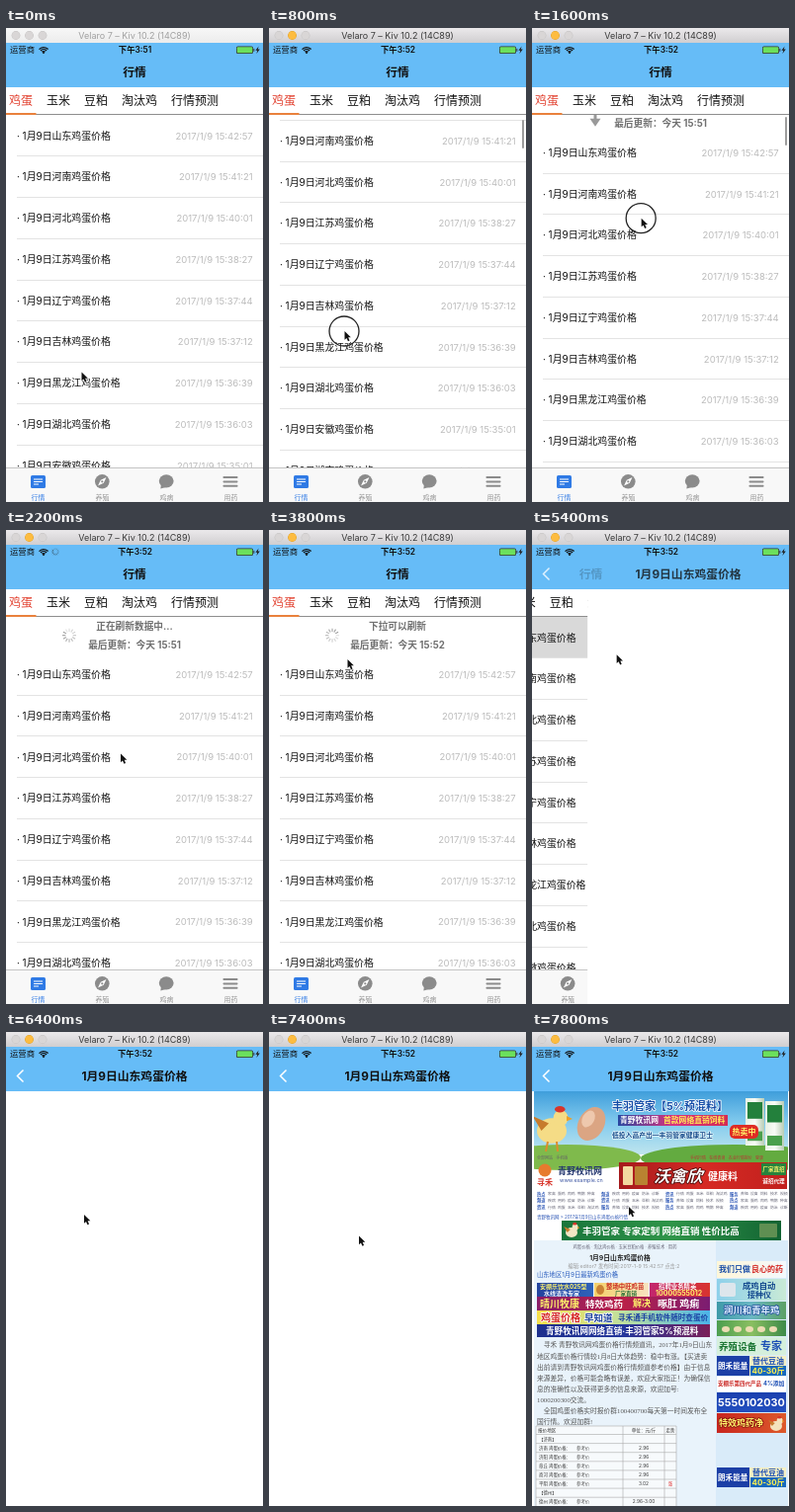
An HTML page with a canvas for the animation above (8000 ms loop, 260 by 480 pixels).

```html
<!DOCTYPE html>
<html lang="zh-CN">
<head>
<meta charset="utf-8">
<style>
html, body { margin: 0; width: 100%; height: 100%; overflow: hidden; background: #fff; }
canvas { display: block; width: 260px; height: 480px; }
</style>
</head>
<body>
<canvas id="stage"></canvas>
<script>
const W = 260, H = 480, LOOP = 8000, STEP = 200;
const SANS = 'Inter, "Noto Sans CJK SC", "Noto Sans CJK", sans-serif';
const SERIF = '"Liberation Serif", "Noto Sans CJK SC", "Noto Sans CJK", serif';
const BLUE = '#66bcf7', GREY = '#929292', ROW = 41.75, TOP = 88, HEAD = 37.4;
const ACTIVE = 200, RELEASE = 2000, REFRESHED = 3800, TAP = 5000, OPEN = 5200, LOADED = 7600;
const canvas = document.getElementById('stage');
const g = canvas.getContext('2d');
const dpr = window.devicePixelRatio || 1;
canvas.width = W * dpr;
canvas.height = H * dpr;

const rows = [
  ['山东', '42:57'], ['河南', '41:21'], ['河北', '40:01'], ['江苏', '38:27'],
  ['辽宁', '37:44'], ['吉林', '37:12'], ['黑龙江', '36:39'], ['湖北', '36:03'],
  ['安徽', '35:01'], ['湖南', '34:22'], ['江西', '33:40'], ['四川', '33:05']
];

// Finger drags: list and cursor move together, with resistance past the top
const shiftKeys = [[0, 0], [ACTIVE, 0], [800, -36.5], [1000, -48], [1200, -48], [1800, 50],
  [RELEASE, 42], [2200, HEAD], [REFRESHED, HEAD], [4200, 0], [LOOP, 0]];
const cursorKeys = [[0, 76.5, 348.5], [ACTIVE, 76.5, 348.5], [800, 76.5, 307], [1000, 78, 295],
  [1200, 100, 125], [1800, 116, 226.5], [2400, 116, 226.5], [REFRESHED, 79.5, 131],
  [4800, 87, 114.5], [OPEN, 87, 114.5], [6400, 79, 185], [7000, 84, 236],
  [7800, 98, 177], [LOOP, 98, 177]];

// Linear interpolation through [time, ...values]
function at(keys, t) {
  let i = 1;
  while (i < keys.length - 1 && keys[i][0] < t) i++;
  const a = keys[i - 1], b = keys[i];
  const k = Math.min(1, Math.max(0, (t - a[0]) / (b[0] - a[0])));
  return a.slice(1).map((v, n) => v + (b[n + 1] - v) * k);
}

function rect(x, y, w, h, color) {
  g.fillStyle = color;
  g.fillRect(x, y, w, h);
}

function box(x, y, w, h, r, color) {
  g.fillStyle = color;
  g.beginPath();
  g.roundRect(x, y, w, h, r);
  g.fill();
}

function oval(x, y, rx, ry, color, turn = 0) {
  g.fillStyle = color;
  g.beginPath();
  g.ellipse(x, y, rx, ry, turn, 0, 7);
  g.fill();
}

function poly(points, color) {
  g.fillStyle = color;
  g.beginPath();
  points.forEach(([x, y]) => g.lineTo(x, y));
  g.closePath();
  g.fill();
}

function line(points, color, width = 1) {
  g.strokeStyle = color;
  g.lineWidth = width;
  g.beginPath();
  points.forEach(([x, y]) => g.lineTo(x, y));
  g.stroke();
}

// y is the visual middle of the line
function text(str, x, y, size, color, o = {}) {
  g.font = `${o.style || ''} ${o.weight || 400} ${size}px ${o.font || SANS}`;
  g.textAlign = o.align || 'left';
  g.textBaseline = 'alphabetic';
  if (o.edge) {
    g.strokeStyle = o.edge;
    g.lineWidth = 1.6;
    g.lineJoin = 'round';
    g.strokeText(str, x, y + size * 0.37);
  }
  g.fillStyle = color;
  g.fillText(str, x, y + size * 0.37);
}

function bold(str, x, y, size, color, edge) {
  text(str, x, y, size, color, { weight: 700, edge });
}

function mid(str, x, y, size, color, weight = 400) {
  text(str, x, y, size, color, { align: 'center', weight });
}

function fade(x, y, w, h, colors, down) {
  const grad = g.createLinearGradient(x, y, down ? x : x + w, down ? y + h : y);
  colors.forEach((c, i) => grad.addColorStop(i / (colors.length - 1), c));
  rect(x, y, w, h, grad);
}

function clipped(x, y, w, h, draw) {
  g.save();
  g.beginPath();
  g.rect(x, y, w, h);
  g.clip();
  draw();
  g.restore();
}

function spinner(x, y, r, t, shade) {
  const lead = Math.floor(t / 100) % 12;
  for (let i = 0; i < 12; i++) {
    const a = i * Math.PI / 6, age = (lead - i + 12) % 12;
    g.globalAlpha = 0.85 - age * 0.055;
    line([[x + Math.sin(a) * r * 0.52, y - Math.cos(a) * r * 0.52],
      [x + Math.sin(a) * r, y - Math.cos(a) * r]], shade, r * 0.16);
  }
  g.globalAlpha = 1;
}

function windowBar(active) {
  fade(0, 0, W, 15, active ? ['#ebe9eb', '#d0ced0'] : ['#f7f7f7', '#ececec'], true);
  [10, 23.5, 37].forEach((x, i) => {
    const on = active && i === 1;
    oval(x, 7.5, 4.4, 4.4, on ? '#dfa023' : '#c3c1c1');
    oval(x, 7.5, 3.9, 3.9, on ? '#fdbc40' : '#d9d6d6');
  });
  mid('Velaro 7 – Kiv 10.2 (14C89)', 130, 7.7, 9, active ? '#3a3a3a' : '#a0a0a0');
}

function statusBar(t) {
  text('运营商', 4, 22.3, 8.4, '#111');
  for (let r = 2; r < 7; r += 2) {
    g.strokeStyle = '#111';
    g.lineWidth = 1.3;
    g.beginPath();
    g.arc(38, 25.6, r, -Math.PI * 0.77, -Math.PI * 0.23);
    g.stroke();
  }
  oval(38, 25, 1, 1, '#111');
  if (t >= RELEASE && t < REFRESHED) spinner(50, 22, 3.8, t, '#222');
  mid(t < ACTIVE ? '下午3:51' : '下午3:52', 130.5, 22.3, 8.4, '#111', 600);
  box(233, 18.5, 17, 7.5, 1.6, '#333');
  box(233.7, 19.2, 15.6, 6.1, 1, '#6be05c');
  rect(250.3, 20.8, 1, 3, '#333');
  poly([[255.6, 18.5], [252.4, 22.8], [254.3, 22.8], [253.4, 26], [256.8, 21.6], [254.8, 21.6]], '#222');
}

function categories() {
  rect(0, 60, W, 28, '#fff');
  rect(0, 87, W, 1, '#8e8e8e');
  rect(0, 86, 30.5, 2, '#e9813c');
  ['鸡蛋', '玉米', '豆粕', '淘汰鸡', '行情预测'].forEach((name, i) =>
    text(name, [3, 41, 79, 117, 167][i], 73.3, 12, i ? '#111' : '#e2402f'));
}

function refreshHead(shift, t) {
  const y = TOP + shift - HEAD;
  const busy = t >= RELEASE && t < REFRESHED, done = t >= REFRESHED;
  const label = busy ? '正在刷新数据中...' : !done && shift > HEAD ? '松开立即刷新' : '下拉可以刷新';
  mid(label, 130, y + 9.4, 9.7, '#707070', 700);
  mid('最后更新：今天 ' + (done ? '15:52' : '15:51'), 130, y + 28, 9.7, '#707070', 700);
  if (busy || done) {
    spinner(64, y + 18.7, 7, t, '#8a8a8a');
    return;
  }
  const up = shift > HEAD ? -1 : 1, m = y + 18.7;
  line([[64, m - 12 * up], [64, m + 8 * up]], '#999', 3);
  poly([[58.5, m + 5 * up], [69.5, m + 5 * up], [64, m + 13 * up]], '#999');
}

function list(shift, t) {
  rect(0, TOP, W, 358, '#fff');
  clipped(0, TOP, W, 358, () => {
    if (shift > 0) refreshHead(shift, t);
    rows.forEach(([place, time], i) => {
      const y = TOP + shift + i * ROW;
      if (i === 0 && t >= TAP && t < 6000) rect(0, y, W, ROW, '#d9d9d9');
      text(`· 1月9日${place}鸡蛋价格`, 11, y + 21, 9.9, '#111');
      text(`2017/1/9 15:${time}`, 249.7, y + 21, 9.5, '#bcbcbc', { align: 'right' });
      rect(11, Math.floor(y + ROW), W - 11, 1, '#e3e3e3');
    });
    if (t > ACTIVE && t < 2200) box(256, 90 - Math.min(shift, 0) * 0.08, 2, 29, 1, '#9c9c9c');
  });
}

function tabBar() {
  rect(0, 446, W, 34, '#f8f8f8');
  rect(0, 445, W, 1, '#c4c4c4');
  box(25, 453, 15, 13, 1.6, '#2f7ae5');
  [[28, 456.5, 9], [28, 459, 9], [28, 461.5, 5]].forEach(([x, y, w]) => rect(x, y, w, 1, '#fff'));
  oval(97.3, 459.3, 7.3, 7.3, '#8b8b8b');
  poly([[101.5, 455], [98.8, 460.8], [93, 463.6], [95.8, 457.8]], '#fff');
  oval(97.3, 459.3, 1.1, 1.1, '#8b8b8b');
  oval(162.2, 458.8, 7.4, 6.6, '#8b8b8b');
  poly([[157, 462], [156.3, 466.5], [162, 465]], '#8b8b8b');
  for (let y = 454; y < 465; y += 4.4) box(219.5, y, 15, 2, 0.8, '#8b8b8b');
  ['行情', '养殖', '鸡病', '用药'].forEach((name, i) =>
    mid(name, 32.5 + i * 65, 475, 6.9, i ? GREY : '#2f7ae5'));
}

function hen(x, y, s, body) {
  oval(x, y, s, s * 0.85, body);
  oval(x + s * 0.6, y - s * 0.85, s * 0.5, s * 0.55, body);
  oval(x + s * 0.55, y - s * 1.45, s * 0.35, s * 0.22, '#d8352a');
  poly([[x + s, y - s], [x + s * 1.4, y - s * 0.8], [x + s, y - s * 0.65]], '#eda029');
  poly([[x - s * 0.7, y], [x - s * 1.3, y - s], [x - s * 0.2, y - s * 0.5]], '#c77b2c');
}

function bag(x, y, w, h) {
  fade(x, y, w, h, ['#e8f0e4', '#f8fbf6', '#b9cdb5']);
  rect(x + 2, y + 4, w - 4, h * 0.35, '#23803c');
  rect(x + 2, y + h * 0.7, w - 4, h * 0.2, '#4aa04c');
}

function topBanner() {
  fade(0, 60, W, 64, ['#3f9edb', '#83cbee', '#bfe5ee'], true);
  oval(35, 127, 75, 13, '#7fba4c');
  oval(205, 128, 95, 14, '#63ab40');
  oval(60, 93, 13, 18, '#dba583', 0.5);
  oval(57, 88, 6, 9, '#eec8ad', 0.5);
  hen(20, 100, 15, '#f5dc86');
  line([[16, 111], [14, 121]], '#dd8c2c', 2);
  line([[25, 111], [26, 121]], '#dd8c2c', 2);
  bold('丰羽管家【5%预混料】', 81, 75, 11, '#164fa8', '#fff');
  fade(87, 84, 111, 11, ['#2747a0', '#d8337e', '#d32c54']);
  bold('青野牧讯网', 89, 89.5, 7.8, '#fff');
  bold('首款网络直销饲料', 133, 89.5, 7.8, '#ffed57');
  bold('低投入高产出—丰羽管家健康卫士', 81, 104.5, 6.8, '#174c8c', '#e7f6fa');
  bag(216, 67, 19, 48);
  bag(236, 70, 19, 50);
  box(200, 94, 29, 14, 5, '#df2c24');
  mid('热卖中', 214.5, 101, 8, '#fff36b', 700);
}

function siteHead() {
  text('全部网站   手机版', 5, 128, 4, '#666');
  text('手机行情   在线咨询   农业行情报价   登录', 160, 128, 4, '#b33');
  oval(13, 140, 6.5, 6.5, '#e77b2e');
  bold('寻禾', 5, 152, 8, '#d8342a');
  bold('青野牧讯网', 26, 140.5, 9, '#24366f');
  text('www.example.cn', 28, 150, 5.4, '#3a53a0');
  fade(88, 132, 170, 27, ['#a51a1c', '#d62a24', '#c1201d']);
  box(92, 136, 10, 19, 1, '#f2d9a0');
  box(104, 136, 13, 19, 1, '#b98331');
  text('沃禽欣', 123, 145.5, 16.5, '#fff', { weight: 900, style: 'italic', edge: '#4c0908' });
  bold('健康料', 178, 146, 10, '#fff');
  rect(232, 133, 25, 12, '#27833d');
  mid('厂家直招', 244.5, 139, 5.6, '#fff36b', 700);
  mid('诚招代理', 244.5, 151, 5.6, '#fff', 700);
  const links = ['家禽  蛋鸡  肉鸡  鸭鹅  种禽', '疾病  用药  疫苗  防治  诊断',
    '行情  鸡蛋  玉米  豆粕  淘汰鸡', '养殖  设备  饲料  技术  视频'];
  for (let r = 0; r < 3; r++) {
    for (let c = 0; c < 4; c++) {
      const x = 5 + c * 65, y = 164 + r * 6.6;
      bold(['热点', '频道', '资讯', '服务'][(r + c) % 4], x, y, 4.2, '#2b55b5');
      text(links[(r + c) % 4], x + 11, y, 3.9, '#667');
    }
  }
  text('青野牧讯网 > 2017年1月9日山东鸡蛋价格行情', 5, 187, 4.5, '#2b55b5');
  fade(30, 191, 222, 20, ['#19753b', '#2f9549', '#126332']);
  hen(40, 203, 6, '#f1e6c4');
  bold('丰羽管家 专家定制 网络直销 性价比高', 51, 201, 9.5, '#fff');
  box(230, 194, 18, 14, 1, '#5f8f52');
}

function article() {
  rect(0, 211, 186, 269, '#e9f3fb');
  mid('鸡蛋价格 · 淘汰鸡价格 · 玉米豆粕价格 · 养殖技术 · 用药', 94, 217, 4.3, '#667');
  mid('1月9日山东鸡蛋价格', 89, 228.5, 6.8, '#222', 700);
  mid('编辑:editor7 发布时间:2017-1-9 15:42:57 点击:2', 93, 237, 5.2, '#999');
  text('山东地区1月9日最新鸡蛋价格', 5, 246, 6.3, '#2559bc');

  fade(5, 254, 57, 14, ['#23439f', '#2f62b9']);
  bold('安棚乐饮水025型', 8, 258, 6, '#fff36b');
  bold('水线清洗专家', 12, 264.5, 6, '#fff');
  fade(63, 254, 55, 14, ['#f4d06a', '#f7e3c0']);
  bold('整场中旺鸡苗', 75, 258, 6.4, '#c92b25');
  bold('厂家直销', 84, 264.5, 5.5, '#276f36');
  oval(69, 261, 4, 5, '#c98235');
  fade(119, 254, 61, 14, ['#c2266d', '#d8342f']);
  bold('招聘业务精英', 128, 258, 6.4, '#fff');
  bold('10000555012', 125, 264.5, 7, '#fff36b');

  fade(5, 268, 175, 14, ['#8a1d68', '#b92048', '#7b1d72']);
  bold('晴川牧康', 8, 275, 10, '#fff36b');
  bold('特效鸡药', 54, 275, 9.5, '#fff');
  bold('解决', 102, 275, 9, '#fff36b');
  bold('啄肛 鸡痢', 127, 275, 10, '#fff');
  fade(5, 282, 175, 14, ['#f8e04a', '#bfe0a0', '#4bb4e8']);
  bold('鸡蛋价格', 9, 289, 10, '#d52320', '#fff');
  bold('早知道', 53, 289, 9.5, '#1c429e', '#fff');
  bold('寻禾通手机软件随时查蛋价', 87, 289, 7.6, '#1a3fa2');
  fade(5, 296, 175, 13, ['#1d2f8e', '#24379c', '#7a1f58']);
  bold('青野牧讯网网络直销·丰羽管家5%预混料', 14, 302.5, 8.6, '#fff');

  ['　寻禾 青野牧讯网鸡蛋价格行情频道讯，2017年1月9日山东',
    '地区鸡蛋价格行情较1月8日大体趋势：稳中有涨。【买进卖',
    '出前请到青野牧讯网鸡蛋价格行情频道参考价格】由于信息',
    '来源差异，价格可能会略有误差，欢迎大家指正！为确保信',
    '息的准确性以及获得更多的信息来源，欢迎加号:',
    '1000200300交流。',
    '　全国鸡蛋价格实时报价群100400700每天第一时间发布全',
    '国行情。欢迎加群!'
  ].forEach((s, i) => text(s, 5, 317 + i * 11.1, 6.75, '#555', { font: SERIF }));
  priceTable();
}

function priceTable() {
  rect(4, 399, 142, 81, '#f7fafc');
  text('报价地区', 6, 403.5, 4.6, '#333');
  mid('单位：元/斤', 113, 403.5, 4.6, '#333');
  mid('走势', 140, 403.5, 4.6, '#333');
  const cells = [['【济南】', ''], ['济南', '2.96'], ['济阳', '2.96'], ['章丘', '2.96'],
    ['商河', '2.96'], ['平阴', '3.02'], ['【德州】', ''], ['德州', '2.96-3.00']];
  cells.forEach(([place, price], i) => {
    const y = 407.5 + i * 9.1;
    line([[4, y], [146, y]], '#aaa', 0.6);
    text(price ? place + ' 鸡蛋价格：' : place, 7, y + 4.4, 4.4, '#333');
    if (!price) return;
    text('参考价', 45, y + 4.4, 4.4, '#555');
    mid(price, 113, y + 4.4, 4.8, '#333');
    if (i === 5) mid('涨', 140, y + 4.4, 4.4, '#d22');
  });
  [4, 92, 134, 146].forEach(x => line([[x, 399], [x, H]], '#aaa', 0.6));
  line([[4, 399], [146, 399]], '#aaa', 0.6);
}

function oilAd(y) {
  rect(187, y, 70, 20, '#f4efc4');
  rect(187, y, 33, 20, '#1c3fa6');
  bold('朗禾能量', 188, y + 10, 7.6, '#fff');
  rect(221, y + 10, 36, 10, '#1769bd');
  mid('替代豆油', 239, y + 5, 8, '#1d4fb5', 700);
  mid('40-30斤', 239, y + 15, 8, '#fff04e', 700);
}

function sideAds() {
  rect(186, 211, 74, 269, '#d9ebf9');
  fade(187, 232, 70, 17, ['#fff6d8', '#f3f8fc']);
  bold('我们只做', 189, 240.5, 8, '#1a4da6');
  bold('良心的药', 222, 240.5, 8, '#d42723');
  fade(187, 250, 70, 22, ['#8dd0ea', '#c9ead6']);
  bold('成鸡自动', 213, 256.5, 8.4, '#13498e');
  bold('接种仪', 218, 266, 8, '#13498e');
  box(190, 254, 16, 14, 2, '#dde6ec');
  fade(187, 273, 70, 18, ['#3f9aa8', '#6ab7c4', '#5ba065']);
  bold('润川和青年鸡', 194, 282, 9.4, '#dff0ff', '#2a58a0');
  fade(187, 292, 70, 16, ['#4c9e4f', '#8abf62', '#3c8a48']);
  for (let x = 196; x < 256; x += 12) oval(x, 301, 4, 3, '#ecdcb4');
  rect(187, 309, 70, 18, '#d5efdc');
  bold('养殖设备', 189, 318, 9.6, '#16722f');
  bold('专家', 231, 318, 11, '#1d4fb5');
  oilAd(328);
  rect(187, 349, 70, 15, '#fff');
  bold('安棚乐第四代产品', 188, 356, 5.5, '#c9221e');
  bold('4%添加', 234, 356, 5.8, '#1d4fb5');
  fade(187, 365, 70, 20, ['#1b3fae', '#2350c0'], true);
  bold('5550102030', 188, 375, 10.8, '#fff');
  fade(187, 386, 70, 20, ['#c8261f', '#dd5a2b']);
  bold('特效鸡药净', 189, 396, 9, '#fff36b', '#8f1810');
  hen(247, 399, 6, '#f4e3bd');
  oilAd(441);
}

function webPage() {
  clipped(2, 60, 257, 420, () => {
    topBanner();
    siteHead();
    article();
    sideAds();
  });
}

function shiftedBy(x, draw) {
  g.save();
  g.translate(x, 0);
  draw();
  g.restore();
}

function cursor(x, y, down) {
  if (down) {
    g.strokeStyle = '#222';
    g.lineWidth = 1.3;
    g.beginPath();
    g.arc(x - 0.5, y, 15, 0, 7);
    g.stroke();
  }
  const tip = [[0, 0], [0, 10], [2.3, 8], [4, 11.8], [5.8, 11], [4.2, 7.3], [7.3, 7.3]]
    .map(([a, b]) => [x + a * 0.87, y + b * 0.87]);
  line([...tip, tip[0]], '#fff', 1.3);
  poly(tip, '#111');
}

function paint(t) {
  g.setTransform(dpr, 0, 0, dpr, 0, 0);
  rect(0, 0, W, H, '#fff');
  const p = Math.min(1, Math.max(0, (t - OPEN) / 500));
  const push = 1 - (1 - p) ** 3;

  if (push < 1) shiftedBy(-W * 0.3 * push, () => {
    list(at(shiftKeys, t)[0], t);
    categories();
    tabBar();
  });
  if (push > 0) shiftedBy(W * (1 - push), () => {
    rect(0, 60, W, 420, '#fff');
    if (t >= LOADED) webPage();
  });

  rect(0, 15, W, 45, BLUE);
  g.globalAlpha = 1 - push;
  mid('行情', 130 - 90 * push, 44.5, 11.8, '#111', 700);
  g.globalAlpha = push;
  mid('1月9日山东鸡蛋价格', 130 + 130 * (1 - push), 44.5, 11.8, '#111', 700);
  line([[17.5, 38.5], [11.5, 44.5], [17.5, 50.5]], '#fff', 1.5);
  g.globalAlpha = 1;
  statusBar(t);
  windowBar(t >= ACTIVE);

  const down = [[ACTIVE, 1000], [1200, RELEASE], [TAP, OPEN]].some(([a, b]) => t >= a && t < b);
  cursor(...at(cursorKeys, t), down);
}

function tick(now) {
  paint(Math.floor((now % LOOP) / STEP) * STEP);
  requestAnimationFrame(tick);
}
requestAnimationFrame(tick);
</script>
</body>
</html>
```
